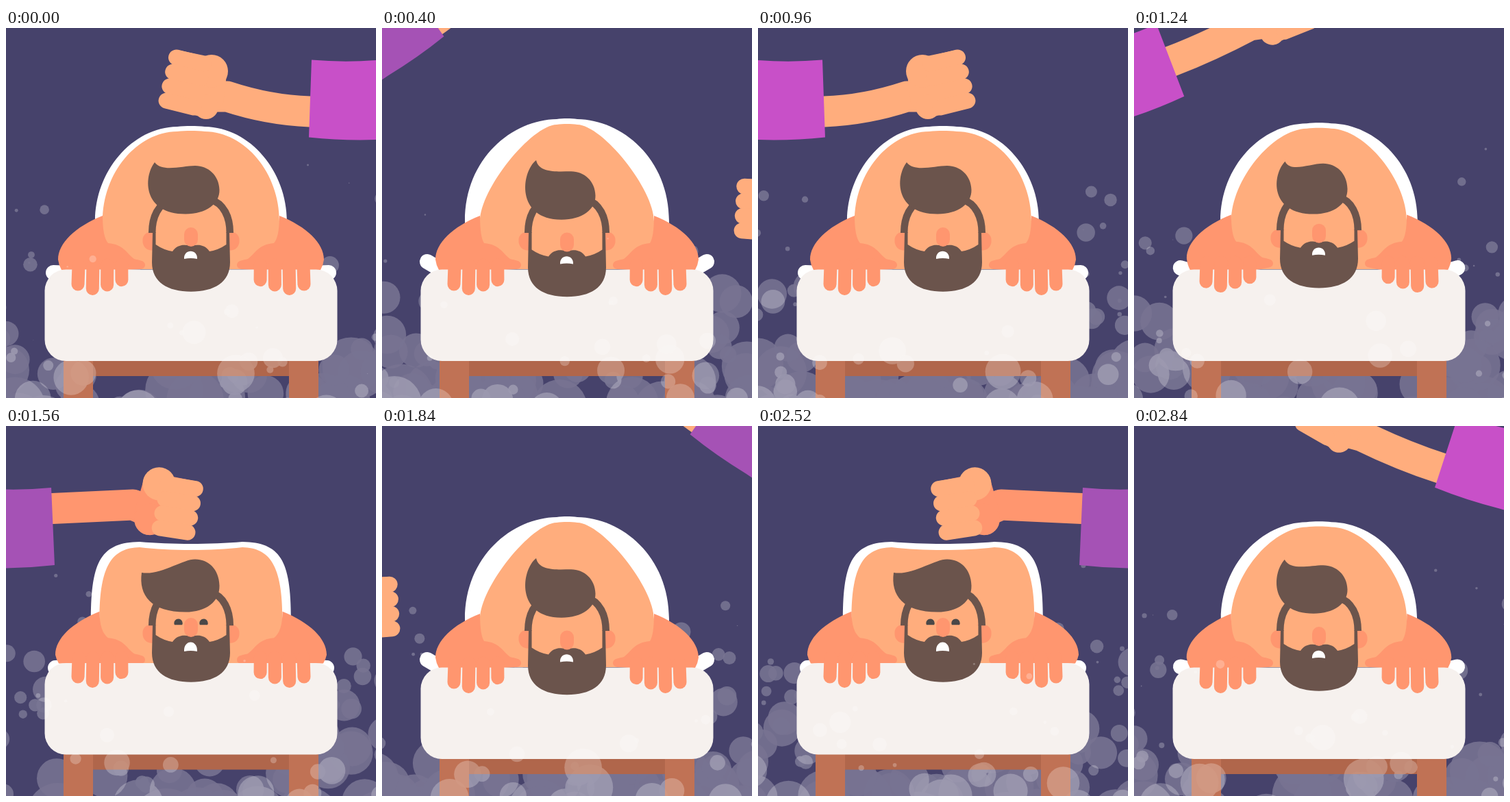
Write an HTML page with a canvas that moves like this. It is 540 px wide and 540 px high and loops after 2880 ms.

```html
<!DOCTYPE html>
<html>
<head>
<meta charset="utf-8">
<style>
html, body { margin: 0; width: 100%; height: 100%; overflow: hidden; background: #46426b; }
canvas { display: block; width: 540px; height: 540px; }
</style>
</head>
<body>
<canvas id="stage" width="540" height="540"></canvas>
<script>
const ctx = document.getElementById('stage').getContext('2d');
const mist = document.createElement('canvas');
mist.width = mist.height = 540;
const mistCtx = mist.getContext('2d');

const LOOP = 2880, STEP = 40, BEAT = 480, FIRST_HIT = 120;
const NIGHT = '#46426b', SKIN = '#ffad7d', SHADE = '#ff966f', HAIR = '#6b544c';
const SIDES = 'RLLLRR';

// ---------- helpers ----------
const mod = (a, n) => ((a % n) + n) % n;

// Keys are [time, ...values]; the values are blended linearly.
function sample(keys, time) {
  let i = 0;
  while (i < keys.length - 2 && keys[i + 1][0] <= time) i++;
  const a = keys[i], b = keys[i + 1];
  const k = Math.min(1, Math.max(0, (time - a[0]) / (b[0] - a[0])));
  return a.map((v, j) => v + (b[j] - v) * k).slice(1);
}

function shape(color, d) {
  ctx.fillStyle = color;
  ctx.fill(new Path2D(d));
}

function line(color, width, d) {
  ctx.strokeStyle = color;
  ctx.lineWidth = width;
  ctx.stroke(new Path2D(d));
}

function disc(c, color, x, y, r) {
  c.fillStyle = color;
  c.beginPath();
  c.arc(x, y, r, 0, Math.PI * 2);
  c.fill();
}

function box(color, x, y, w, h, r) {
  ctx.fillStyle = color;
  ctx.beginPath();
  ctx.roundRect(x, y, w, h, r);
  ctx.fill();
}

function mirrored(flip, draw) {
  ctx.save();
  if (flip) { ctx.translate(540, 0); ctx.scale(-1, 1); }
  draw();
  ctx.restore();
}

function bothSides(draw) {
  mirrored(false, draw);
  mirrored(true, draw);
}

// ---------- steam ----------
const RISE = 0.265;
let seed = 77;
const rand = (lo, hi) => {
  seed = (seed * 1664525 + 1013904223) % 4294967296;
  return lo + (hi - lo) * seed / 4294967296;
};

// Most puffs fade low; a few climb much higher.
function makePuffs(count, rMin, rMax, life, extra) {
  return Array.from({ length: count }, () => ({
    birth: rand(0, LOOP), x: rand(-15, 555), y: rand(560, 620),
    r: rand(rMin, rMax), drift: rand(-0.02, 0.02),
    life: life + extra * rand(0, 1) ** 2
  }));
}
const backPuffs = makePuffs(270, 28, 54, 800, 800);
const frontPuffs = makePuffs(170, 18, 42, 400, 650);

function drawPuffs(c, color, puffs, t) {
  for (const p of puffs) {
    const age = mod(t - p.birth, LOOP);
    if (age < p.life) disc(c, color, p.x + p.drift * age, p.y - RISE * age, p.r * (1 - age / p.life));
  }
}

// ---------- body motion over one beat ----------
const squashKeys = [[0, 1], [40, 1], [80, 0.9], [200, -1.1], [280, -1], [320, -0.35], [360, 0], [400, 1.1], [480, 1]];
const flapKeys = [[0, 1], [40, 0.28], [120, 0], [360, 0], [400, 1], [480, 1]];
const nodKeys = [[0, -11], [40, -20], [90, -22], [220, 9], [280, 7.5], [320, 2], [360, 0], [480, -11]];

function mound(color, { left, c1y, c2x, edge, top, dip }) {
  const mid = top + (dip - top) * 4 / 3;
  const a = edge + (270 - edge) * 0.6;
  shape(color, `M${left} 352 V282 C${left} ${c1y} ${c2x} ${top + 1} ${edge} ${top}
    C${a} ${mid} ${540 - a} ${mid} ${540 - edge} ${top}
    C${540 - c2x} ${top + 1} ${540 - left} ${c1y} ${540 - left} 282 V352 Z`);
}

// flat and tall are the squashed and stretched amounts, flap is the towel pressed to the back
function backShape(flat, tall) {
  const top = 151 + 26 * flat - 10 * tall;
  return {
    left: 141 - 4.5 * flat + 2 * tall, c1y: 212 - 9 * flat + 23 * tall,
    c2x: 190 - 35 * flat + 28 * tall, edge: 250 - 55 * flat + 5 * tall,
    top, dip: top - 1 + 5 * flat
  };
}

function towelShape(flat, tall, flap) {
  const top = 144 + 25 * flap - 11 * tall;
  return {
    left: 130 - flat * (9 - 3 * flap) - 9 * tall, c1y: 210 - flat * (25 - 10 * flap) - 20 * tall,
    c2x: 183 - flat * (18 + 25 * flap) + 7 * tall, edge: 250 - 55 * flap + 5 * tall,
    top, dip: top - 1 + 4 * flap
  };
}

function shoulder(left, wide, lift, tableY) {
  const x = 76 - wide, y = 353 + tableY, start = 274 + lift * 0.4, crest = 338 + lift * 0.5, h = lift * 0.6;
  shape(SHADE, `M${left} ${start} C${101 - wide} ${start + 16} ${x} ${crest - 24} ${x} ${crest}
    Q${x + 1} ${y - 7} ${x + 5} ${y} H180 L196 ${352 + h} Q203 ${351 + h} 203 ${346 + h}
    C203 ${339 + h} 194 ${339 + h} 187 ${337 + h} C175 ${328 + h} 172 ${316 + h} 149 ${314 + h}
    Q${left} ${305 + h} ${left} ${start} Z`);
}

function fingers(dy) {
  ctx.lineCap = 'round';
  for (let i = 0; i < 4; i++) {
    const x = 105 + 21.3 * i, tip = 374 + 6.5 * Math.sin(i * 1.5);
    line(SHADE, 19, `M${x + 1 - i * 0.4} ${346 + dy} L${x} ${tip + dy}`);
  }
}

function table(dy) {
  ctx.save();
  ctx.translate(0, dy);
  shape('#b0664b', 'M120 480 H420 V508 H120 Z');
  shape('#c07255', 'M84 480 H127 V560 H84 Z M413 480 H456 V560 H413 Z');
  box('#f6f1ee', 56.5, 352.5, 427, 133.5, 31);
  ctx.restore();
}

function quiff(flat, tall, nod) {
  const up = Math.min(0, nod + 11) * 0.75, down = Math.max(0, nod) * 1.1;
  const b = 271.5 + up + down, t = 201 + Math.min(0, nod) * 0.6 + down;
  const x = 217 - 19 * flat + 8 * tall, y = 196 + 18 * flat - 3 * tall + up;
  const lag = 217 - x;
  shape(HAIR, `M${x} ${y} C${x - 17 + lag * 0.65} ${y + 22 + lag * 0.6} ${200 + lag * 0.63} ${b} 262 ${b}
    C292 ${b} 312 ${b - 15} 311.5 ${(b + t) / 2}
    C311 ${t + 14} 295 ${t} 276 ${t}
    C257 ${t} ${x + 11 + lag * 0.85} ${y + 15 - lag * 0.55} ${x} ${y} Z`);
}

function head(flat, tall, nod) {
  const ear = 298 + Math.min(0, nod) * 0.7;
  const Y = y => y + nod;
  bothSides(() => {
    box(SHADE, 199.5, ear, 22, 26.5, [11, 0, 0, 13]);
    shape(SKIN, `M218 ${ear} h8 v28 h-8 Z`);
    ctx.lineCap = 'butt';
    line(HAIR, 10.5, `M213.2 ${ear + 1} C213.2 ${ear - 22} 222 ${ear - 42} 242 ${ear - 48}`);
  });

  shape(HAIR, `M214 ${ear} H218.5 V${Y(316)} Q230 ${Y(324)} 243 ${Y(326)}
    C248 ${Y(318)} 257 ${Y(316)} 263 ${Y(317)} H277 C283 ${Y(316)} 292 ${Y(318)} 297 ${Y(326)}
    Q310 ${Y(324)} 321.5 ${Y(316)} V${ear} H326 L327 ${Y(342)}
    C327 ${Y(371)} 304 ${Y(384.7)} 270 ${Y(384.7)} C236 ${Y(384.7)} 213 ${Y(371)} 213 ${Y(342)} Z`);
  quiff(flat, tall, nod);

  // half closed eyes while squashed
  const lid = flat > 0.5 ? 0.14 : -0.5;
  for (const x of [251.5, 288.5]) {
    ctx.fillStyle = '#4a4848';
    ctx.beginPath();
    ctx.arc(x, Y(298.6), 6.2, Math.PI * (1 - lid), Math.PI * (2 + lid));
    ctx.fill();
  }
  box(SHADE, 260, Y(291), 20, 28, 10);
  const low = Y(337) + 3 * flat;
  shape('#fff', `M260 ${low} C259 ${Y(322)} 280 ${Y(322)} 279 ${low} Q269.5 ${low - 2} 260 ${low} Z`);
}

// ---------- pounding arms, drawn for the right side ----------
// wrist x, y, turn, sleeve x, y, turn, arm offset within the sleeve
const strike = [338, 122, -23, 471.5, 146.5, 2.5, -26];
const recoil = [356, 102, -19.6, 492, 128, 7, -26];
const raised = [350, -115, 35, 482, -34, 35, 30];
const swing = [316, 10, 16, 456.5, 36, 18, 27];
const ready = [305, 100, 0, 444, 103, 2, 19];
const poundKeys = [[0, ...strike], [40, ...recoil], [280, ...raised], [320, ...swing], [360, ...ready], [BEAT, ...strike]];

const shifted = (pose, dx, dy, turn) =>
  [pose[0] + dx, pose[1] + dy, pose[2] + turn, pose[3] + dx, pose[4] + dy, ...pose.slice(5)];

function pound(ph) {
  const dip = ph > 360 ? 30 * Math.sin(Math.PI * (ph - 360) / (BEAT - 360)) : 0;
  return shifted(sample(poundKeys, ph), 0, dip, 0);
}

function leave(ph) {
  const k = (ph - 40) / 240;
  return k < 0 ? pound(ph) : shifted(recoil, 238 * k, 176 * k, 10 * k);
}

function enter(ph) {
  const k = (280 - ph) / 120;
  return k < 0 ? pound(ph) : shifted(raised, 150 * k, -100 * k, 0);
}

function fist(dark) {
  const palm = dark ? SHADE : SKIN;
  shape(palm, 'M-55 -68 L-12 -59 L18 -40 L12 10 L-10 32 L-72 17 Z');
  disc(ctx, palm, -13, 15, 18);
  if (dark) disc(ctx, palm, -13, 10, 23);
  disc(ctx, SKIN, -5, dark ? -43 : -37, 24);
  ctx.lineCap = 'round';
  for (let i = 0; i < 4; i++) line(SKIN, 23, `M${-56.5 - 4.8 * i} ${-57 + 21 * i} l40 10`);
}

function arm([wx, wy, wa, sx, sy, sa, off], ph, flip) {
  const dark = ph < 20 || ph >= 400;
  const darkSleeve = dark || (ph >= 240 && ph < 300);
  const rad = Math.PI / 180;
  const c = Math.cos(sa * rad), s = Math.sin(sa * rad);
  const ex = sx - s * off, ey = sy + c * off;
  const ax = wx + 18 * Math.cos(wa * rad), ay = wy + 18 * Math.sin(wa * rad);
  mirrored(flip, () => {
    ctx.lineCap = 'butt';
    ctx.lineJoin = 'round';
    line(dark ? SHADE : SKIN, 45,
      `M${wx} ${wy} L${ax} ${ay} Q${ex - 60 * c} ${ey - 60 * s} ${ex} ${ey} l${20 * c} ${20 * s}`);
    ctx.save();
    ctx.translate(wx, wy);
    ctx.rotate(wa * rad);
    fist(dark);
    ctx.restore();
    ctx.translate(sx, sy);
    ctx.rotate(sa * rad);
    shape(darkSleeve ? '#a552b5' : '#c850c8', 'M0 -56.5 Q50 -54 100 -60 H320 V56.5 H100 Q50 60 0 56.5 Z');
  });
}

function drawArms(beat, ph) {
  const now = SIDES[beat], next = SIDES[(beat + 1) % SIDES.length];
  if (now === next) {
    arm(pound(ph), ph, now === 'L');
    return;
  }
  if (ph < 400) arm(leave(ph), ph, now === 'L');
  if (ph >= 160) arm(enter(ph), ph, next === 'L');
}

// ---------- frame ----------
function draw(t) {
  const u = mod(t - FIRST_HIT, LOOP);
  const beat = Math.floor(u / BEAT), ph = u % BEAT;
  const [squash] = sample(squashKeys, ph), [flap] = sample(flapKeys, ph), [nod] = sample(nodKeys, ph);
  const flat = Math.max(0, squash), tall = Math.max(0, -squash);
  const tableY = -3 * flat - 3.5 * flap, lift = 0.73 * Math.min(0, nod);
  const back = backShape(flat, tall), towel = towelShape(flat, tall, flap);

  ctx.fillStyle = NIGHT;
  ctx.fillRect(0, 0, 540, 540);
  drawPuffs(ctx, 'rgba(120,116,146,0.88)', backPuffs, t);

  ctx.lineCap = 'round';
  bothSides(() => line('#fff', 22,
    `M${69 + 3 * flat - 3 * tall} ${357 - 4 * flat - 16 * tall} L95 ${358 + tableY}`));
  mound('#fff', towel);
  if (back.dip - towel.dip > 20) shape('#f3eeec', 'M205 180 Q270 168 335 180 V192 H205 Z');
  mound(SKIN, back);
  bothSides(() => shoulder(back.left, 4 * flat - 2 * tall, lift, tableY));
  table(tableY);
  bothSides(() => fingers(lift));
  head(flat, tall, nod);
  drawArms(beat, ph);

  mistCtx.clearRect(0, 0, 540, 540);
  drawPuffs(mistCtx, 'rgba(255,255,255,0.9)', frontPuffs, t);
  ctx.globalAlpha = 0.27;
  ctx.drawImage(mist, 0, 0);
  ctx.globalAlpha = 1;
}

const start = performance.now();
function tick() {
  const t = (performance.now() - start) % LOOP;
  draw(Math.floor(t / STEP) * STEP);
  requestAnimationFrame(tick);
}
tick();
</script>
</body>
</html>
```
